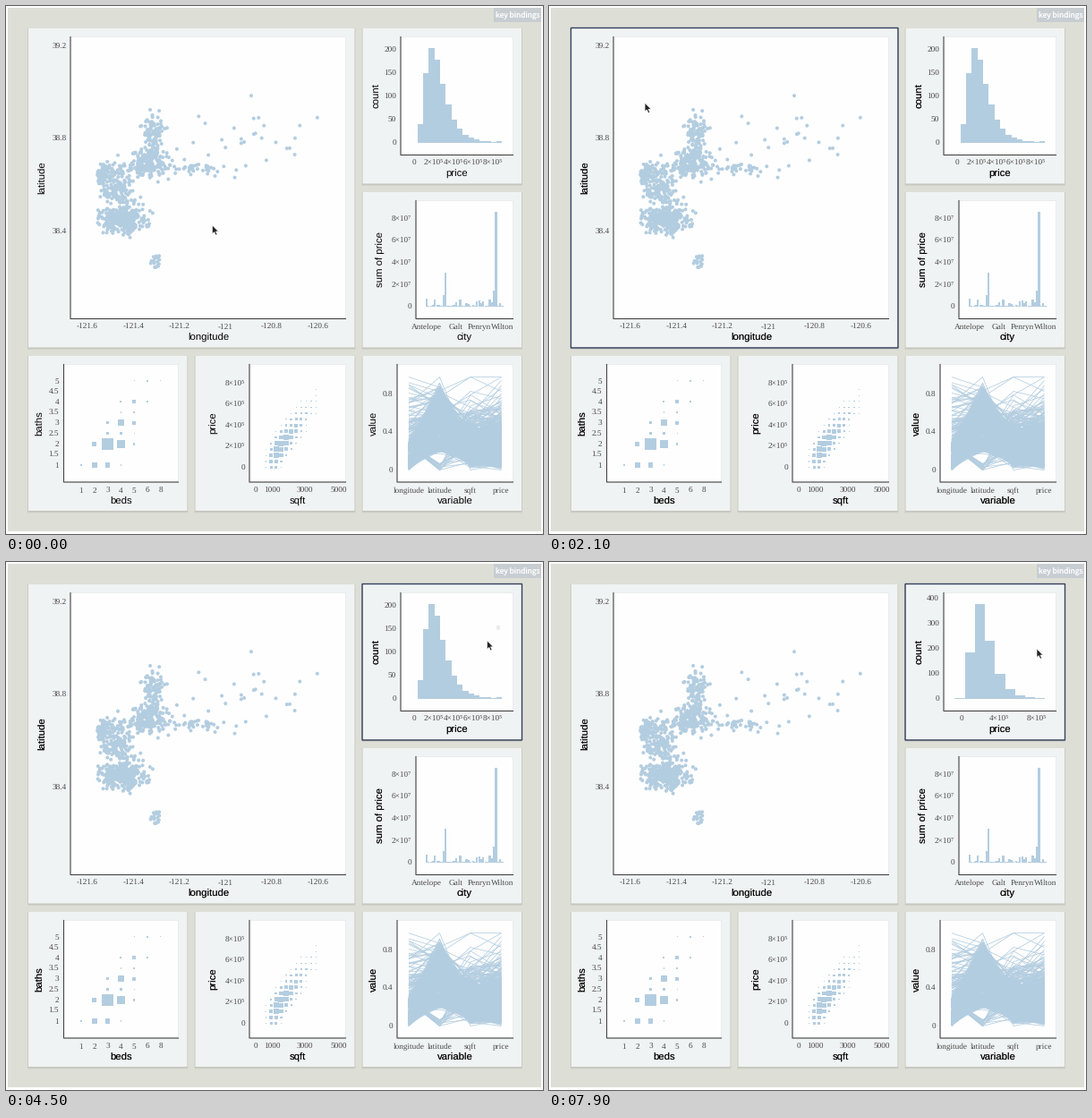
Recreate the animation shown at these times as a matplotlib script. Size 600 by 590 pixels, loop 8 s.

```python
import numpy as np
import matplotlib.pyplot as plt
from matplotlib.animation import FuncAnimation
from matplotlib.collections import LineCollection, PolyCollection
from matplotlib.patches import Polygon, Rectangle

W, H, DPI, STEP, LOOP = 600, 590, 100, 100, 8000
PX = 72 / DPI
LIGHT, DARK, INK = "#b3cde0", "#4472ae", "#4a4a4a"
plt.rcParams["text.hinting"] = "none"
rng = np.random.default_rng(7)

fig = plt.figure(figsize=(W / DPI, H / DPI), dpi=DPI, facecolor="white")
ax = fig.add_axes([0, 0, 1, 1])
ax.set_xlim(0, W)
ax.set_ylim(H, 0)
ax.axis("off")

# panel box, then plot area box
PANELS = {
    "map": ((25, 25, 389.5, 381.5), (72, 34.5, 379.5, 349.5)),
    "hist": ((398.5, 25, 576, 198.5), (441, 34.5, 566.5, 166.5)),
    "city": ((398.5, 208, 576, 381.5), (458, 217.5, 566.5, 349.5)),
    "beds": ((25, 391, 202.5, 564), (64.5, 400.5, 192.5, 532)),
    "sqft": ((211.5, 391, 389.5, 564), (272, 400.5, 379.5, 532)),
    "lines": ((398.5, 391, 576, 564), (437, 400.5, 566.5, 532)),
}


def rect(x0, y0, x1, y1, color, z=1, **kw):
    kw.setdefault("lw", 0)
    return ax.add_patch(Rectangle((x0, y0), x1 - x0, y1 - y0, fc=color, zorder=z,
                                  snap=False, **kw))


def boxes(items, color, z):
    verts = [[(a, b), (c, b), (c, d), (a, d)] for a, b, c, d in items]
    return ax.add_collection(PolyCollection(verts, facecolor=color, lw=0, zorder=z))


def squares(items, color, z):
    return boxes([(x - s / 2, y - s / 2, x + s / 2, y + s / 2) for x, y, s in items], color, z)


def city_bars(heights, color, z):
    return boxes([(x - 1.1, 336 - h, x + 1.1, 336) for x, h in zip(city_x, heights)], color, z)


def line_bundle(some_paths, color, z):
    return ax.add_collection(LineCollection(some_paths, colors=color, lw=0.75 * PX, zorder=z))


def tick(x, y, label, ha="center"):
    return ax.text(x, y + 3.1, label, ha=ha, va="baseline", color=INK, zorder=8,
                   family="Liberation Serif", size=9.3 * PX)


def title(x, y, label, rotation=0, alpha=1):
    return ax.text(x, y, label, ha="center", va="baseline", rotation=rotation,
                   rotation_mode="anchor", color="black", alpha=alpha, zorder=8,
                   family="Liberation Sans", size=11.4 * PX)


def sci(mantissa, power):
    return f"{mantissa}×10{power}" if mantissa else "0"


# ---- data ----
N = 912
# towns as normal clouds: centre, spread, weight
TOWNS = np.array([
    (107, 187, 3, 6, 7), (126, 188, 9, 8, 9), (122, 209, 9, 6, 9),
    (130, 237, 12, 8, 36), (161, 175, 10, 8, 22), (165, 142, 6, 11, 11),
    (215, 182, 18, 3, 4), (167, 286, 2.5, 3.5, 2), (275, 150, 38, 24, 4)])
town = TOWNS[rng.choice(len(TOWNS), N, p=TOWNS[:, 4] / TOWNS[:, 4].sum())]
points = rng.normal(town[:, :2], town[:, 2:4])
points[:, 0] = 102 + abs(points[:, 0] - 102)
points = np.clip(points, (102, 91), (349, 292))

# log-normal prices, measured in bins of the first histogram
HX, BIN, BINS = 453.3, 6.3, 16
quantiles = np.quantile(rng.normal(size=200000), (np.arange(N) + 0.5) / N)
price_u = rng.permutation(np.clip(np.exp(1.461 + 0.45 * quantiles), 0.5, BINS - 0.1))
price_bin = price_u.astype(int)
price = 0.58 * price_u - 0.3
price_norm = (price - price.min()) / np.ptp(price)
sqft_norm = 0.06 + 0.65 * price_norm * np.exp(rng.normal(0, 0.35, N)) + rng.normal(0, 0.04, N)

low, high = points.min(axis=0), points.max(axis=0)
place = (points - low) / (high - low)
norm = np.column_stack([place[:, 0], 1 - place[:, 1], sqft_norm, price_norm])
line_x = 450 + 34.5 * np.arange(4)
paths = np.stack([np.tile(line_x, (N, 1)), 518.5 - 106 * np.clip(norm, 0, 0.98)], axis=2)

# a few large cities among many small ones
CITIES, BIG = 37, 33
city_x = 470 + 2.347 * np.arange(CITIES)
city_h = 1 + 7 * rng.random(CITIES) ** 3
city_h[[0, 4, 8, 9, 32, BIG]] = 9, 8, 13, 38, 18, 106
north_w = city_h * np.isin(np.arange(CITIES), (0, 4, 19, 30, 32))
north_w[BIG] = 17
south_w = city_h - north_w
city = np.where(points[:, 1] < 185,
                rng.choice(CITIES, N, p=north_w / north_w.sum()),
                rng.choice(CITIES, N, p=south_w / south_w.sum()))


def bell(d, spread):
    return np.exp(-(d / spread) ** 2 / 2)


def bed_side(beds, baths):
    side = 13.2 * np.exp(-0.65 * abs(baths - 2)) * bell(beds - 1.6 - 0.85 * baths, 0.9)
    return side * (0.35 if baths % 1 else 1)


def sqft_side(i, j):
    return 6.2 * bell(i - 3, 1.2 if i < 3 else 4.2) * bell(j - 2.5 - 1.05 * (i - 3), 1.9)


bed_cells = [(69.2 + 14.8 * n, 513 - 23.6 * (b - 1), bed_side(n, b))
             for b in (1, 2, 2.5, 3, 3.5, 4, 5) for n in range(1, 8) if bed_side(n, b) > 0.5]
sqft_cells = [(285 + 5.6 * i, 515.5 - 6.7 * j, sqft_side(i, j), j)
              for i in range(16) for j in range(BINS) if sqft_side(i, j) > 0.5]

# ---- static scene ----
rect(2, 2, 598, 587, "#dddfd6", 0)
rect(545, 2, 598, 18, "#c8cdd2", 1)
ax.text(571.5, 13.3, "key bindings", color="white", ha="center", va="baseline",
        family="Noto Sans CJK JP", size=8.4 * PX, zorder=2)

frames_on = {}
areas = {}
for name, (p, a) in PANELS.items():
    rect(p[0] - 1, p[1], p[2] + 1, p[3] + 2.5, "black", 1, alpha=0.05)
    rect(p[0] - 0.5, p[1], p[2] + 0.5, p[3] + 1.2, "black", 1, alpha=0.07)
    rect(*p, "#f0f3f3", 2)
    areas[name] = rect(*a, "#fefefe", 3, ec="#e6e9e9", lw=0.7 * PX)
    ax.plot([a[0], a[0], a[2]], [a[1], a[3], a[3]], color="#444444", lw=1.1 * PX,
            zorder=7, snap=False)
    frames_on[name] = rect(p[0] - 0.5, p[1] - 0.5, p[2] + 0.5, p[3] + 0.5, "none", 9,
                           ec="#35405f", lw=1.4 * PX)

TITLES = {
    "map": [(226.5, 374, "longitude"), (44, 192, "latitude", 90)],
    "hist": [(503.5, 191, "price"), (416, 100, "count", 90)],
    "city": [(512, 374, "city"), (422, 283, "sum of price", 90)],
    "beds": [(128.5, 556.5, "beds"), (41, 466, "baths", 90)],
    "sqft": [(325.5, 556.5, "sqft"), (234.5, 466, "price", 90)],
    "lines": [(501.5, 556.5, "variable"), (414.5, 466, "value", 90)],
}
overprint = {}
for name, labels in TITLES.items():
    for args in labels:
        title(*args)
    overprint[name] = [title(*args, alpha=0.7) for args in labels]

for k in range(5):
    tick(453, 336 - 24.65 * k, sci(2 * k, "⁷"), "right")
    tick(267, 515.5 - 23.5 * k, sci(2 * k, "⁵"), "right")
for x, label in zip((470, 503, 529, 554.5), ("Antelope", "Galt", "Penryn", "Wilton")):
    tick(x, 358, label)
for i, label in enumerate("1234568"):
    tick(84 + 14.8 * i, 541, label)
for k in range(9):
    tick(59, 513 - 11.8 * k, f"{1 + k / 2:g}", "right")
for v in (0, 1000, 3000, 5000):
    tick(278.5 + 0.0186 * v, 541, str(v))
for v in (0, 0.4, 0.8):
    tick(432, 518.5 - 106 * v, f"{v:g}", "right")
for x, label in zip(line_x, ("longitude", "latitude", "sqft", "price")):
    tick(x, 541, label)

city_bars(city_h, LIGHT, 4)
squares(bed_cells, LIGHT, 4)
squares([c[:3] for c in sqft_cells], LIGHT, 4)
line_bundle(paths, LIGHT, 4)
dots = ax.scatter(*points.T, s=(4 * PX) ** 2, lw=0, zorder=5)
dots.set_clip_path(areas["map"])

ARROW = np.array([(0, 0), (0, 9.6), (2.2, 7.6), (3.9, 11.2), (5.6, 10.4), (3.9, 7), (7, 7)])
pointer = ax.add_patch(Polygon(ARROW, fc="#222222", ec="white", lw=0.6 * PX, zorder=20))

# ---- motion ----
# pointer stops (time, x, y), eased between
GRAB, MAP_START, HIST_START = (231, 242), (102, 102), (552, 71)
STOPS = np.array([
    (0, 230.5, 245), (200, *GRAB), (300, *GRAB), (700, 189, 219), (1300, 283, 262),
    (1600, 283, 262), (2200, 93, 96), (2500, *MAP_START), (3300, 217, 226),
    (3500, 217, 226), (3700, 255, 236), (3800, 255, 236), (4300, *HIST_START),
    (5000, 479, 156), (7400, 479, 156), (7900, 545, 97)])


def cursor(t):
    k = min(np.searchsorted(STOPS[:, 0], t, "right"), len(STOPS) - 1)
    (t0, *a), (t1, *b) = STOPS[k - 1], STOPS[k]
    s = np.clip((t - t0) / (t1 - t0), 0, 1)
    return np.array(a) + (np.array(b) - a) * s * s * (3 - 2 * s)


def view_shift(t):
    if 400 <= t < 1800:
        return cursor(min(t - 100, 1200)) - GRAB
    return np.zeros(2)


def brush(t):
    """Panel name and box of the brush; its corner trails the pointer by one step."""
    if 2700 <= t < 4400:
        return "map", (*MAP_START, *cursor(min(t - 100, 3400)))
    if 4500 <= t < 5500:
        x, y = cursor(t - 100)
        return "hist", (x, HIST_START[1], HIST_START[0], y)
    return None, None


def selection(panel, box):
    if panel is None:
        return np.zeros(N, bool)
    x0, y0, x1, y1 = box
    if panel == "map":
        return ((points >= (x0, y0)) & (points <= (x1, y1))).all(axis=1)
    counts = np.bincount(price_bin, minlength=BINS)
    right = HX + BIN * np.arange(1, BINS + 1)
    hit = (right > x0) & (153 - 106 * counts / counts.max() < y1)
    return hit[price_bin]


def share(groups, sel, size):
    total = np.bincount(groups, minlength=size)
    return np.bincount(groups[sel], minlength=size) / np.maximum(total, 1)


def draw_hist(n, sel):
    merged = BINS - n
    origin = 456.4 + 0.66 * merged
    scale = 10.5 + 0.4 * ((n - 9) / 7) ** 6
    peak = 204 + 13.4 * merged + 1.62 * merged ** 2
    edges = np.linspace(HX, HX + BIN * BINS, n + 1)
    cuts = (edges - origin) / scale if merged else 0.58 * np.arange(BINS + 1) - 0.3
    counts = np.histogram(price, cuts)[0]
    unit = 106 / counts.max()

    def bars(values, color, z):
        return boxes([(a, 153 - max(unit * v, 0.7), b + 0.2, 153.3)
                      for a, b, v in zip(edges, edges[1:], values) if v], color, z)

    out = [bars(counts, LIGHT, 4)]
    if sel.any():
        out.append(bars(np.histogram(price[sel], cuts)[0], DARK, 5))
    marks = range(0, 9, 2) if not merged else (0, 2, 6, 10) if n > 11 else (0, 4, 8)
    for m in marks:
        out.append(tick(origin + scale * m, 175, "1×10⁶" if m == 10 else sci(m, "⁵")))
    for v in range(0, 500, 50 if peak < 230 else 100):
        y = 153 - 106 * v / peak
        if y >= 34:
            out.append(tick(436, y, str(v), "right"))
    return out


def draw_map_ticks(dx, dy):
    out = []
    for k in range(-2, 9):
        x = 91 + 51.5 * k + dx
        if 72 <= x <= 380:
            out.append(tick(x, 358, f"{round(-121.6 + 0.2 * k, 1):g}"))
    for k in range(-2, 5):
        y = 44.5 + 103.4 * k + dy
        if 34 <= y <= 349.5:
            out.append(tick(68, y, f"{round(39.2 - 0.4 * k, 1):g}", "right"))
    return out


live = []


def update(frame):
    t = frame * STEP
    while live:
        live.pop().remove()

    active = None if t < 400 else "map" if t < 4400 else "hist"
    for name in PANELS:
        frames_on[name].set_visible(name == active)
        for label in overprint[name]:
            label.set_visible(t >= (400 if name == "map" else 1800))

    panel, box = brush(t)
    sel = selection(panel, box)
    shift = view_shift(t)
    dots.set_offsets(points + shift)
    dots.set_facecolor(np.where(sel, DARK, LIGHT))
    live.extend(draw_map_ticks(*shift))

    bins = BINS if t < 6500 else max(9, 15 - (t - 6500) // 200)
    live.extend(draw_hist(bins, sel))

    if panel:
        live.append(rect(*box, "#ebebeb", 3.5))
    if sel.any():
        by_price = share(price_bin, sel, BINS)
        side = np.sqrt(sel.mean())
        live.append(city_bars(city_h * share(city, sel, CITIES), DARK, 5))
        live.append(squares([(x, y, s * side) for x, y, s in bed_cells], DARK, 5))
        live.append(squares([(x, y, s * np.sqrt(by_price[j]))
                             for x, y, s, j in sqft_cells], DARK, 5))
        live.append(line_bundle(paths[sel], DARK, 5))

    pointer.set_xy(ARROW + cursor(t))
    return []


anim = FuncAnimation(fig, update, frames=LOOP // STEP, interval=STEP,
                     init_func=lambda: [], repeat=True, repeat_delay=0, blit=False)
plt.show()
```
